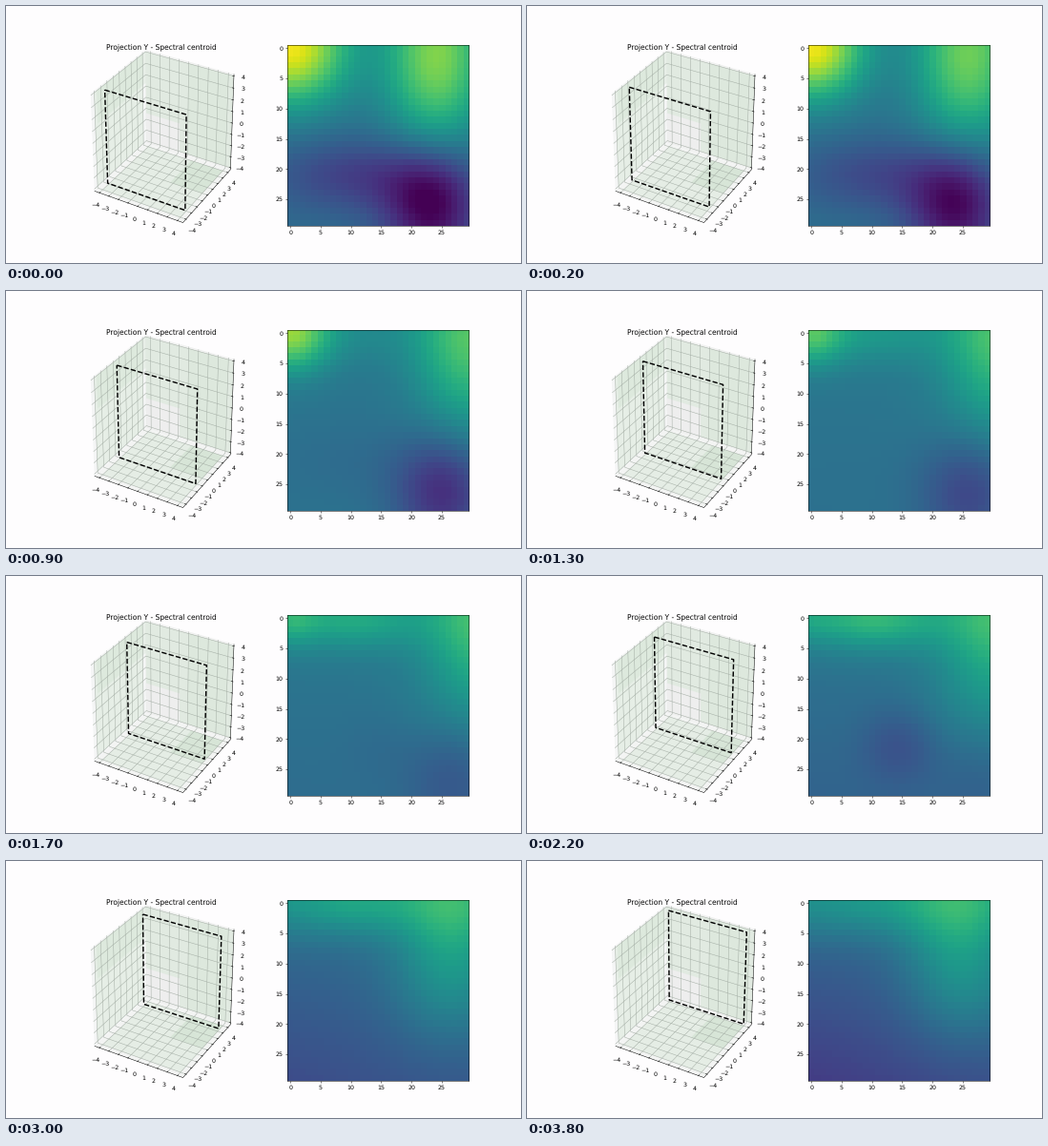
Recreate the animation shown at these times as a matplotlib script. Size 540 px wide and 270 px high, loop 3.9 s.

```python
import numpy as np
import matplotlib.pyplot as plt
from matplotlib.animation import FuncAnimation

plt.rcParams["font.family"] = "DejaVu Sans"
plt.rcParams["text.hinting"] = "none"

FRAMES = 39
SLICES = 30
FIRST = 3                           # slice shown at the start of the loop
EDGE = 0.5 + 1 / 48                 # walls sit slightly outside the limits
REACH = 0.459                       # where the data value 4 lies on x and y
TICKS = np.arange(-4, 5)

# Camera basis for a unit cube seen from azimuth -60, elevation 30
AZ, EL, DIST = np.radians(-60), np.radians(30), 10
NEAR = np.array([np.cos(AZ) * np.cos(EL), np.sin(AZ) * np.cos(EL), np.sin(EL)])
RIGHT = np.array([-np.sin(AZ), np.cos(AZ), 0])
UP = np.cross(NEAR, RIGHT)

X, Y = np.meshgrid(*[np.linspace(0, 1, SLICES)] * 2)


def project(points):
    """Perspective projection of cube-centred points."""
    p = np.asarray(points, float)
    depth = DIST - p @ NEAR
    return np.column_stack([p @ RIGHT / depth, p @ UP / depth])


def bump(x, y, wx, wy):
    return np.exp(-((X - x) / wx) ** 2 / 2 - ((Y - y) / wy) ** 2 / 2)


def pulse(u, peak, width):
    return np.exp(-((u - peak) / width) ** 2)


def field(s):
    """Heat map of slice s: smooth hills and hollows that drift and fade."""
    u = (s - FIRST) / (SLICES - 1 - FIRST)
    swing = np.sin(np.pi * u)
    corner = 0.23 * np.exp(-1.5 * u)
    z = 0.36 + 0.04 * swing
    # bright corner, bright right lobe, late glow along the top and right
    z = z + 0.62 * pulse(u, 0, 0.42) * bump(0, 0, corner, corner)
    z += (0.17 + 0.28 * np.exp(-u / 0.4)) * bump(
        0.83 + 0.25 * swing, 0.05, 0.21, 0.36)
    z += 0.2 * pulse(u, 0.65, 0.3) * bump(0.35, 0, 0.25, 0.12)
    z += 0.12 * u * np.exp(-(Y / 0.15) ** 2 / 2)
    z += 0.1 * u ** 2 * bump(0.9, 0.5, 0.25, 0.25)
    # dark pool, early band, passing hollow, darkening floor
    z -= 0.36 * pulse(u, 0, 0.45) * bump(0.8 + 0.25 * u, 0.9, 0.19, 0.22)
    z -= 0.17 * pulse(u, 0, 0.2) * bump(0.38, 0.73, 0.33, 0.15)
    z -= 0.1 * pulse(u, 0.65, 0.12) * bump(0.5, 0.73, 0.15, 0.15)
    z -= u ** 2 * Y * (0.18 - 0.06 * X)
    return np.clip(z, 0, 1)


def slice_at(frame):
    return min(SLICES - 1, FIRST + int(0.76 * frame + 0.5))


def plane(s):
    y = -REACH + 2 * REACH * s / (SLICES - 1)
    corners = [(-1, 1), (1, 1), (1, -1), (-1, -1), (-1, 1)]
    return project([(REACH * a, y, b / 2) for a, b in corners])


fig = plt.figure(figsize=(12, 6), dpi=45, facecolor="#fefdfe")
box = fig.add_subplot(1, 2, 1)
box.set(xlim=(-0.095, 0.09), ylim=(-0.095, 0.09))
box.axis("off")


def wall(axis, level, first, second, color, alpha=1.0):
    """Filled rectangle on the wall where the given axis equals level."""
    (a0, a1), (b0, b1) = first, second
    quad = [[a0, b0], [a1, b0], [a1, b1], [a0, b1]]
    box.fill(*project(np.insert(quad, axis, level, axis=1)).T,
             facecolor=color, alpha=alpha, lw=0)


def line(points, color):
    box.plot(*project(points).T, color=color, lw=0.8, clip_on=False,
             solid_capstyle="butt")


FULL, WIDE, TALL = (-EDGE, EDGE), (-REACH, REACH), (-0.5, 0.5)
wall(0, -EDGE, FULL, FULL, "#f4f5f5")
wall(1, EDGE, FULL, FULL, "#f0f1f0")
wall(2, -EDGE, FULL, FULL, "#f3f4f3")

# Pale green tints
wall(0, -EDGE, WIDE, TALL, "#e6eee6")
wall(1, EDGE, FULL, TALL, "#e1eae1")
wall(2, -EDGE, WIDE, WIDE, "#e5ede5")
wall(0, -EDGE, (-0.42, EDGE), (0.16, 0.5), "#cfe2cf", 0.35)
wall(1, EDGE, (0, REACH), TALL, "#d8e6d8", 0.4)
wall(2, -EDGE, (0.08, REACH), (0, REACH), "#cbdfcb", 0.5)
wall(1, EDGE, (-EDGE, -0.1), (-EDGE, -0.18), "#eeeeee")

for v in TICKS:
    p, z, e = v * REACH / 4, v / 8, EDGE
    for path in ([(p, -e, -e), (p, e, -e), (p, e, e)],
                 [(e, p, -e), (-e, p, -e), (-e, p, e)],
                 [(-e, -e, z), (-e, e, z), (e, e, z)]):
        line(path, "#a3ada4")

line([(-EDGE, -EDGE, -EDGE), (EDGE, -EDGE, -EDGE), (EDGE, EDGE, -EDGE),
      (EDGE, EDGE, EDGE)], "black")

TICK_IN, TICK_OUT = EDGE - 0.2 / 12, EDGE + 0.1 / 12
FAR = EDGE + 0.0722
for v in TICKS:
    p, z = v * REACH / 4, v / 8
    line([(p, -TICK_IN, -EDGE), (p, -TICK_OUT, -EDGE)], "black")
    line([(TICK_IN, p, -EDGE), (TICK_OUT, p, -EDGE)], "black")
    line([(TICK_IN, EDGE, z), (TICK_OUT, EDGE, z)], "black")
    label = str(v).replace("-", "\u2212")
    for x, y in project([(p, -FAR, -FAR), (FAR, p, -FAR), (FAR, FAR, z)]):
        box.text(x, y, label, size=10, ha="center", va="top")

box.annotate("Projection Y - Spectral centroid", (0.5, 0.92),
             xycoords="axes fraction", xytext=(0, 6),
             textcoords="offset points", size=12, ha="center", va="baseline")

frame_line, = box.plot([], [], "k--", lw=2.3, clip_on=False)

heat = fig.add_subplot(1, 2, 2)
spot = heat.get_position()
heat.set_position([spot.x0 - 0.0012, spot.y0, spot.width, spot.height])
image = heat.imshow(field(FIRST), cmap="viridis", vmin=0, vmax=1,
                    interpolation="nearest")
heat.set(xticks=range(0, 30, 5), yticks=range(0, 30, 5))


def update(frame):
    s = slice_at(frame)
    frame_line.set_data(*plane(s).T)
    image.set_data(field(s))
    return frame_line, image


anim = FuncAnimation(fig, update, frames=FRAMES, interval=100, repeat=True)
plt.show()
```
